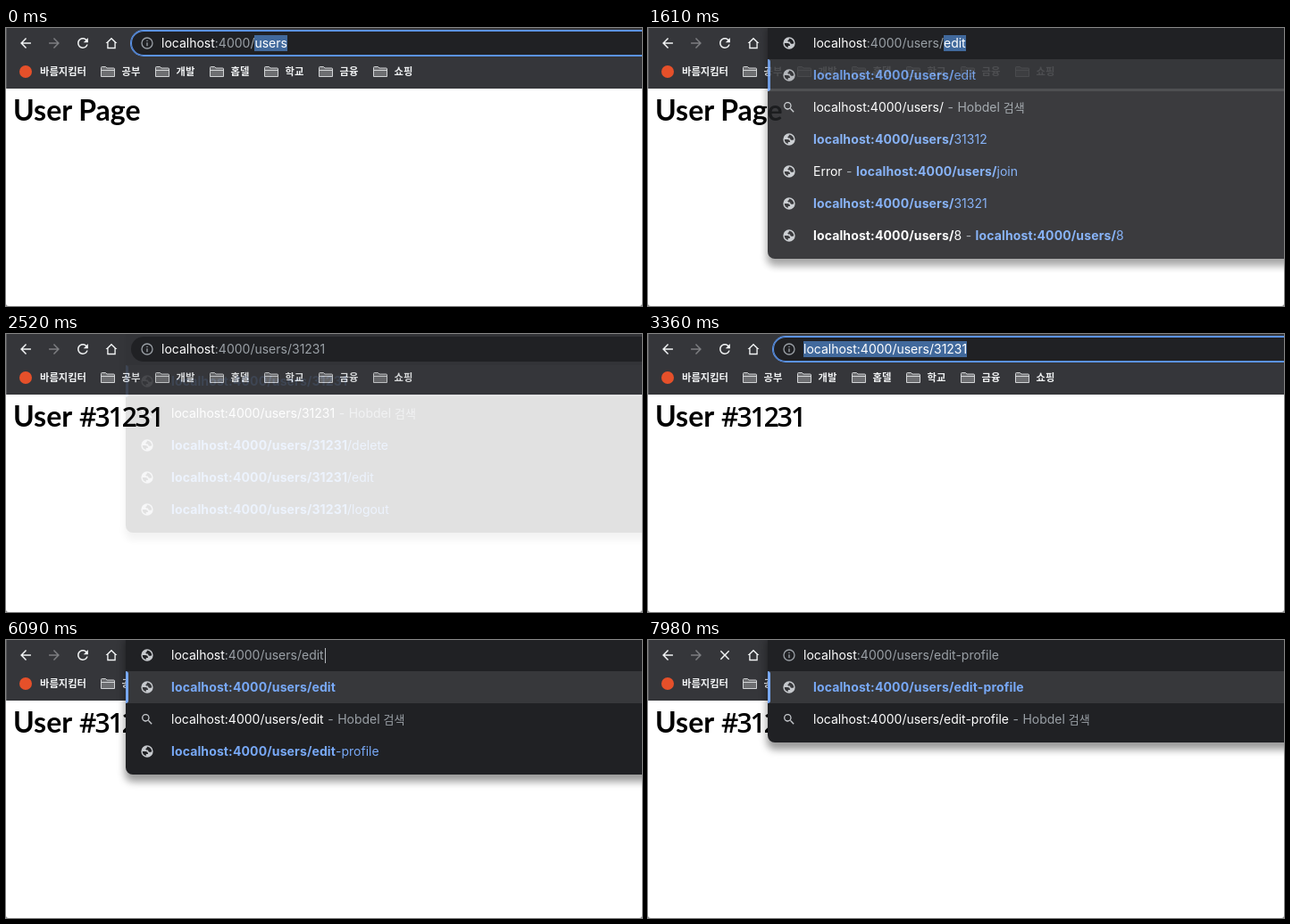
Recreate the animation shown at these times as an HTML page. Size 712 px wide and 312 px high, loop 8000 ms.

```html
<!DOCTYPE html>
<html lang="ko">
<head>
<meta charset="utf-8">
<title>Address bar</title>
<style>
  html, body { margin: 0; width: 100%; height: 100%; overflow: hidden; background: #8a8a8a; }
  #stage {
    position: relative; width: 712px; height: 312px; overflow: hidden;
    background: #fff; border-radius: 0 0 3px 3px;
    font: 14px/36px Inter, "Noto Sans CJK KR", sans-serif;
    white-space: pre; color: #fff;
  }
  #stage > * { position: absolute; }
  #chrome { left: 0; top: 0; }
  .mark { font: 700 11.3px "Noto Sans CJK KR", "Noto Sans CJK", sans-serif; fill: #f1f3f4; }
  #title { font: 700 32px Lato, sans-serif; fill: #000; }
  #title .num { font: 600 30px "Open Sans", sans-serif; letter-spacing: -2px; }

  #popup {
    left: 134px; top: -10px; width: 620px; padding: 45px 0 8px;
    background: #202124; border-radius: 8px;
    box-shadow: 0 7px 9px 1px rgba(0, 0, 0, .4);
  }
  .row { position: relative; height: 36px; padding-left: 51px; }
  .row:first-child { background: #37383b; }
  .row:first-child::before {
    content: ""; position: absolute; left: 0; top: 0; width: 3px; height: 36px;
    background: #78a9f7; border-radius: 0 3px 3px 0;
  }
  .row svg, #bar svg { position: absolute; width: 16px; height: 16px; }
  .row svg { left: 16px; top: 10px; fill: #c6c9cd; }
  .row b { font-weight: 700; letter-spacing: .13px; }
  .link { color: #78a9f7; }
  .dim { color: #9aa0a6; }
  .ko { font-size: 13px; }
  .dash { color: #9aa0a6; padding: 0 4.5px; }

  #bar { left: 140px; top: 3px; width: 620px; height: 28px; border-radius: 14px; background: #202124; line-height: 28px; }
  #bar.focus { box-shadow: inset 0 0 0 1px #5b93e8, 0 0 0 1px #5b93e8; }
  #bar.open { left: 134px; top: 0; height: 35px; border-radius: 0; line-height: 34px; }
  #bar svg { left: 10px; top: 6px; fill: #9aa0a6; }
  #bar.open svg { left: 16px; top: 9px; fill: #c6c9cd; }
  #url { position: absolute; left: 34px; top: 0; color: #9aa0a6; }
  .open #url { left: 51px; }
  .open.loading #url { left: 40px; }
  #bar.loading svg { fill: #9aa0a6; }
  #url i { font-style: normal; color: #fff; }
  #url mark { display: inline-block; height: 18px; line-height: 18px; background: #41699c; color: #fff; }
  #url u { display: inline-block; width: 1px; height: 17px; margin-left: 1px; background: #b4b8bd; vertical-align: -4px; }
</style>
</head>
<body>
<div id="stage">
  <svg id="chrome" width="712" height="312">
    <rect width="712" height="68" fill="#35363a"/>
    <rect width="1" height="68" fill="#58595c"/>
    <g id="tools" fill="#f1f3f4"></g>
    <circle cx="22" cy="49" r="7" fill="#e5502a"/>
    <text class="mark" x="38" y="53">바름지킴터</text>
    <g id="folders"></g>
    <text id="title" x="8" y="104"></text>
  </svg>
  <div id="popup"></div>
  <div id="bar"><span id="icon"></span><span id="url"></span></div>
</div>
<script>
const $ = id => document.getElementById(id);
const HOST = 'localhost', PORT = ':4000/', LOOP = 8000;

const ICONS = {
  back: 'M20 11H7.83l5.59-5.59L12 4l-8 8 8 8 1.41-1.41L7.83 13H20z',
  reload: 'M17.65 6.35C16.2 4.9 14.21 4 12 4c-4.42 0-8 3.58-8 8s3.58 8 8 8c3.73 0 6.84-2.55 7.73-6h-2.08c-.82 2.33-3.04 4-5.65 4-3.31 0-6-2.69-6-6s2.69-6 6-6c1.66 0 3.14.69 4.22 1.78L13 11h7V4z',
  stop: 'M19 6.41L17.59 5 12 10.59 6.41 5 5 6.41 10.59 12 5 17.59 6.41 19 12 13.41 17.59 19 19 17.59 13.41 12z',
  home: 'M12 3L2.5 12H5v9h14v-9h2.5zM7 19v-8.3l5-4.8 5 4.8V19z',
  info: 'M11 7h2v2h-2zm0 4h2v6h-2zM12 2a10 10 0 1 0 0 20a10 10 0 1 0 0-20zm0 2a8 8 0 1 1 0 16a8 8 0 1 1 0-16z',
  globe: 'M12 2a10 10 0 1 0 0 20a10 10 0 1 0 0-20zM4.2 12H9c3 0 4.5 1.5 4.5 4.5h-3.3v3A7.8 7.8 0 0 1 4.2 12zM19.8 11.5c-.4 1.2-1.4 1.8-2.9 1.8-2.2 0-3.3-1.3-3.3-3.5h-2.8C9 9 9.3 6.3 11.7 6.3V4.2c4.3 0 7.7 3.2 8.1 7.3z',
  search: 'M15.5 14h-.79l-.28-.27A6.5 6.5 0 1 0 13.73 14.43l.27.28v.79l5 4.99L20.49 19zm-6 0a4.5 4.5 0 1 1 0-9a4.5 4.5 0 1 1 0 9z'
};
const icon = name => `<svg viewBox="0 0 24 24"><path fill-rule="evenodd" d="${ICONS[name]}"/></svg>`;
const tool = (name, x, extra = '') =>
  `<path fill-rule="evenodd" transform="translate(${x} 17) scale(.74) ${extra} translate(-12 -12)" d="${ICONS[name]}"/>`;

$('folders').innerHTML = ['공부', '개발', '홉델', '학교', '금융', '쇼핑'].map((name, i) => `
  <g transform="translate(${106 + 61 * i} 42)">
    <path d="M.5 12.5v-10q0-1 1-1h4l1.5 1.5h7.5q1 0 1 1v8.5zM.5 5.5h15" fill="#6d6e71" stroke="#d2d4d6"/>
    <text class="mark" x="23.5" y="11">${name}</text>
  </g>`).join('');

// Suggestions: first row is the best match, second the web search.
const match = (typed, path) => `<b>${HOST + PORT + typed}</b>${path.slice(typed.length)}`;
const dash = '<span class="dash">-</span>';
const row = (name, html) => `<div class="row">${icon(name)}${html}</div>`;

function suggestions({ query, rows }) {
  const list = rows.map(entry => {
    const [path, title] = entry.split('|');
    const text = match(query, path);
    const head = title ? (title === 'url' ? text : title) + dash : '';
    return row('globe', `${head}<span class="link">${text}</span>`);
  });
  list.splice(1, 0, row('search',
    `${HOST + PORT + query}${dash}<span class="dim">Hobdel <span class="ko">검색</span></span>`));
  return list.join('');
}

function address({ path, sel, caret }) {
  const host = `<i>${HOST}</i>`;
  if (sel === 'all') return `<mark>${host}${PORT}${path}</mark>`;
  const cut = path.length - sel;
  return host + PORT + path.slice(0, cut) +
    (sel ? `<mark>${path.slice(cut)}</mark>` : '') + (caret ? '<u></u>' : '');
}

// Typing state: path with `sel` trailing characters filled in and selected.
const type = (path, sel, rows) => {
  const query = path.slice(0, path.length - sel);
  return { path, sel, caret: !sel, query, ...(rows && { rows }) };
};
const users = names => names.split(' ').map(n => 'users/' + n);
const editRows = q => users(`${q} edit-profile`);
const typeEdit = q => type('users/' + q, 0, editRows(q));

const steps = [
  [0, { path: 'users', sel: 5, caret: false, focus: true, open: false, alpha: 0,
        query: 'users', rows: [], title: 'Page', loading: false }],
  [980, { sel: 0, caret: true }],
  [1540, { open: true, alpha: .3, ...type('users/edit', 4, users('edit 31312 join|Error 31321 8|url')) }],
  [1610, { alpha: .88 }],
  [1680, { alpha: 1 }],
  [1750, type('users/31312', 4, users('31312 31321 31231/delete 31231'))],
  [1820, type('users/31312', 3)],
  [1890, type('users/31231', 2, users('31231 31231/delete 31231/edit 31231/logout 31231/join'))],
  [1960, type('users/31231', 1)],
  [2100, type('users/31231', 0)],
  [2170, { rows: users('31231 31231/delete 31231/edit 31231/logout') }],
  [2520, { open: false, focus: false, caret: false, alpha: .13, title: '31231' }],
  [2590, { alpha: 0 }],
  [3290, { focus: true }],
  [3360, { sel: 'all' }],
  [4690, { sel: 0, caret: true }],
  [5250, { caret: false }],
  [5320, { sel: 5 }],
  [5670, { open: true, alpha: .3, ...type('users/edit', 3, editRows('edit')) }],
  [5740, { alpha: .88 }],
  [5810, { alpha: 1 }],
  [5880, type('users/edit', 2)],
  [5950, type('users/edit', 1)],
  [6090, type('users/edit', 0)],
  [6300, typeEdit('edit-')],
  [6720, { path: 'users/edit-p' }],
  [6790, typeEdit('edit-p')],
  [7000, typeEdit('edit-pr')],
  [7070, typeEdit('edit-pro')],
  [7420, typeEdit('edit-prof')],
  [7490, typeEdit('edit-profi')],
  [7630, typeEdit('edit-profil')],
  [7700, { path: 'users/edit-profile' }],
  [7770, type('users/edit-profile', 0)],
  [7840, { rows: users('edit-profile') }],
  [7980, { caret: false, loading: true }]
];
let last = {};
const states = steps.map(([at, change]) => (last = { ...last, ...change, at }));

function draw(s) {
  $('tools').innerHTML = tool('back', 22) + `<g fill="#7d7e81">${tool('back', 54, 'scale(-1 1)')}</g>` +
    tool(s.loading ? 'stop' : 'reload', 86) + tool('home', 118, 'scale(.92)');
  $('title').innerHTML = 'User ' +
    (s.title === 'Page' ? s.title : `<tspan class="num" x="82">#${s.title}</tspan>`);
  $('popup').style.opacity = s.alpha;
  $('popup').innerHTML = s.alpha ? suggestions(s) : '';
  $('bar').className = (s.open ? 'open' : s.focus ? 'focus' : '') + (s.loading ? ' loading' : '');
  $('icon').innerHTML = icon(s.open && !s.loading ? 'globe' : 'info');
  $('url').innerHTML = address(s);
}

let shown;
const start = performance.now();
function tick() {
  const t = Math.max(0, performance.now() - start) % LOOP;
  const state = states.findLast(s => s.at <= t);
  if (state !== shown) draw(shown = state);
  requestAnimationFrame(tick);
}
tick();
</script>
</body>
</html>
```
